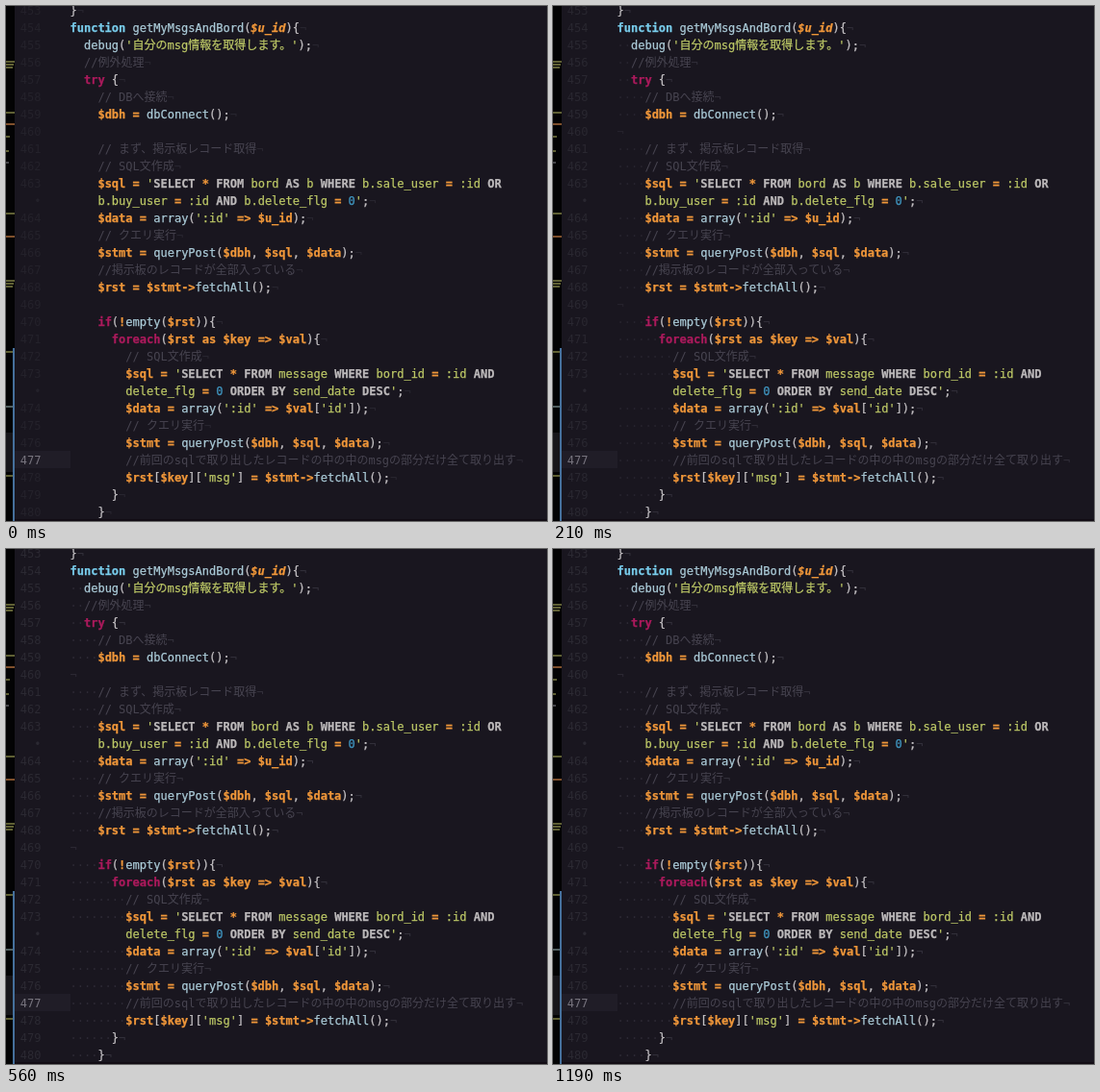
Recreate the animation shown at these times as an HTML page. Size 562x536 px, loop 1260 ms.

```html
<!DOCTYPE html>
<html lang="ja">
<head>
<meta charset="utf-8">
<style>
html, body { margin: 0; width: 100%; height: 100%; overflow: hidden; background: #19161f; }
#stage {
  position: relative; width: 562px; height: 536px; overflow: hidden;
  font: 12px/18px 'DejaVu Sans Mono', 'Noto Sans CJK JP', 'Noto Sans CJK', monospace;
  color: #c4c1c4; font-variant-ligatures: none;
}
.row, .num, #map i, #map, .bar, .glow, .foot { position: absolute; }
.row { left: 66.5px; height: 18px; white-space: pre; -webkit-text-stroke: .25px currentColor; }
.num { left: 14.5px; width: 22px; height: 18px; text-align: right; color: #2b2932; }
.num.on { color: #77747e; }
.v, .k, .d, .s, .q { font-weight: 700; }
.v, .o { color: #f0973a; }
.o { font-weight: 700; }
.k { color: #ab1a5c; }
.d { color: #79cdec; }
.f { color: #abcbd8; }
.s { color: #bcc766; font-weight: 400; }
.q { color: #bcb9ba; }
.n { color: #3f93bd; }
.c { color: #474450; -webkit-text-stroke: 0; }
.p { font-style: italic; }
.dot, .eol { color: #34313c; -webkit-text-stroke: 0; }
.dot { color: #2d2a35; }
.num:not(.on) { animation: nums 1260ms step-end infinite; }
.dot { animation: dots 1260ms step-end infinite; }
.eol { animation: nums 1260ms step-end infinite; }
@keyframes nums {
  0% { opacity: .6; } 5.5556% { opacity: .68; } 11.1111% { opacity: .75; }
  16.6667% { opacity: .9; } 22.2222%, 100% { opacity: 1; }
}
@keyframes dots {
  0% { opacity: 0; } 5.5556% { opacity: .15; } 11.1111% { opacity: .35; }
  16.6667% { opacity: .7; } 22.2222%, 100% { opacity: 1; }
}
#map { left: 0; top: 0; width: 9px; height: 536px; background: #030304; }
#map i { left: 0; height: 1.5px; }
.bar { left: 7px; top: 356px; width: 2px; height: 180px; background: #45709c; }
.glow { left: 9px; top: 463px; width: 58px; height: 18px; background: #201d27; }
.foot { left: 9px; right: 0; bottom: 0; height: 2px; background: #120c14; }
</style>
</head>
<body>
<div id="stage">
  <div id="map"></div>
  <div class="bar"></div>
  <div class="glow"></div>
  <div class="foot"></div>
</div>
<script>
const code = `}
function getMyMsgsAndBord($u_id){
  debug('自分のmsg情報を取得します。');
  //例外処理
  try {
    // DBへ接続
    $dbh = dbConnect();

    // まず、掲示板レコード取得
    // SQL文作成
    $sql = 'SELECT * FROM bord AS b WHERE b.sale_user = :id OR@b.buy_user = :id AND b.delete_flg = 0';
    $data = array(':id' => $u_id);
    // クエリ実行
    $stmt = queryPost($dbh, $sql, $data);
    //掲示板のレコードが全部入っている
    $rst = $stmt->fetchAll();

    if(!empty($rst)){
      foreach($rst as $key => $val){
        // SQL文作成
        $sql = 'SELECT * FROM message WHERE bord_id = :id AND@delete_flg = 0 ORDER BY send_date DESC';
        $data = array(':id' => $val['id']);
        // クエリ実行
        $stmt = queryPost($dbh, $sql, $data);
        //前回のsqlで取り出したレコードの中の中のmsgの部分だけ全て取り出す
        $rst[$key]['msg'] = $stmt->fetchAll();
      }
    }`.split('\n');

const stage = document.getElementById('stage');
const map = document.getElementById('map');
const esc = s => s.replace(/&/g, '&amp;').replace(/</g, '&lt;').replace(/>/g, '&gt;');
const span = (cls, s) => `<span class="${cls}">${esc(s)}</span>`;

function add(parent, tag, cls, top, html = '') {
  const el = document.createElement(tag);
  el.className = cls;
  el.style.top = top + 'px';
  el.innerHTML = html;
  parent.append(el);
  return el;
}

const phpRules = [
  ['c', /^\/\/.*/], ['v', /^\$\w+/], ['d', /^function\b/],
  ['k', /^(try|if|foreach)\b/], ['o', /^(as\b|->|=>|[=!])/],
  ['f', /^\w+/], ['', /^[^]/]
];
const sqlRules = [
  ['q', /^(SELECT|FROM|AS|WHERE|AND|ORDER|BY|DESC|OR)\b/],
  ['o', /^[*=]/], ['n', /^\d+/], ['s', /^([\w.:']+|[^])/]
];

function scan(text, rules) {
  let out = '';
  while (text) {
    const [cls, re] = rules.find(r => r[1].test(text));
    const tok = text.match(re)[0];
    out += cls ? span(cls, tok) : esc(tok);
    text = text.slice(tok.length);
  }
  return out;
}

// quoted parts use the SQL colours, the rest PHP
let quoted = false;
function paint(text) {
  if (text.startsWith('//')) return span('c', text);
  return text.split("'").map((part, i, all) => {
    let html = scan(part, quoted ? sqlRules : phpRules);
    if (i < all.length - 1) {
      html += span('s', "'");
      quoted = !quoted;
    }
    return html;
  }).join('');
}

let y = -4;
code.forEach((line, i) => {
  const indent = line.match(/^ */)[0].length;
  const parts = line.trim().split('@');
  quoted = false;
  parts.forEach((part, j) => {
    const no = 453 + i;
    add(stage, 'div', no === 477 ? 'num on' : 'num', y, j ? '•' : no);
    let html = paint(part);
    if (part.startsWith('function')) html = html.replace('class="v"', 'class="v p"');
    const end = j < parts.length - 1 ? '' : span(part ? 'eol' : 'dot', '¬');
    const lead = j ? ' '.repeat(indent) : span('dot', '·'.repeat(indent));
    add(stage, 'div', 'row', y, lead + html + end);
    y += 18;
  });
});

const olive = '#5f6034', rust = '#80502c';
function tick(top, width, color) {
  const el = add(map, 'i', '', top);
  el.style.width = width + 'px';
  el.style.background = color;
}
add(map, 'i', '', 444).style.cssText += 'width:9px;height:41px;background:#17161a';
[57, 285].forEach(top => {
  for (let k = 0; k < 3; k++) tick(top + k * 3, 9 - k, olive);
});
[[110, 9, olive], [122, 9, rust], [135, 4, olive], [150, 3, olive], [162, 3, '#454549'],
 [215, 9, olive], [239, 9, rust], [359, 7, olive], [416, 7, '#526060'], [488, 7, olive]
].forEach(t => tick(...t));
</script>
</body>
</html>
```
